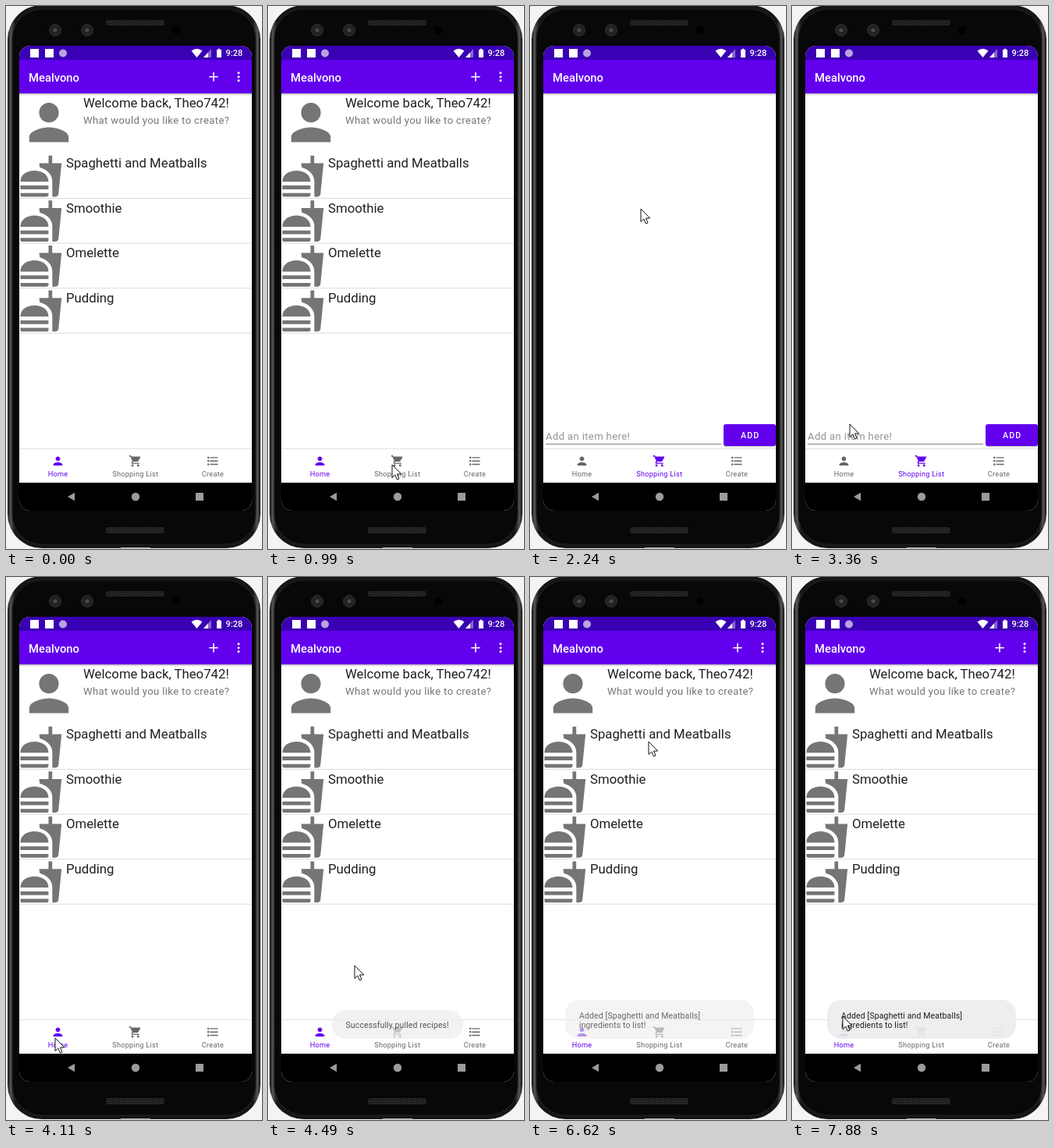
An HTML page that plays this animation: 328 px wide and 696 px high, repeating every 7990 ms.

```html
<!DOCTYPE html>
<html lang="en">
<head>
<meta charset="utf-8">
<title>Recipe app demo</title>
<style>
  html, body { margin: 0; width: 100%; height: 100%; overflow: hidden; background: #f4f4f4; }
  svg { display: block; width: 328px; height: 696px; font-family: Roboto, sans-serif; }
  .row { font-size: 16.75px; fill: #202020; }
  .soft { font-size: 13.1px; letter-spacing: .36px; fill: #757575; }
  .tab { fill: #666; stroke: none; font-size: 9.2px; letter-spacing: .25px; text-anchor: middle; }
  .tab.on { fill: #6200ee; }
  .toast text { font-size: 10.5px; letter-spacing: .12px; fill: #1c1c1c; }
  .toast rect { fill: #ededed; fill-opacity: .93; }
</style>
</head>
<body>
<svg viewBox="0 0 328 696">
  <defs>
    <linearGradient id="rim">
      <stop offset="0" stop-color="#111"/><stop offset=".012" stop-color="#555"/>
      <stop offset=".03" stop-color="#161616"/><stop offset=".97" stop-color="#161616"/>
      <stop offset=".988" stop-color="#555"/><stop offset="1" stop-color="#111"/>
    </linearGradient>
    <linearGradient id="shade" x2="0" y2="1">
      <stop stop-color="#000" stop-opacity=".28"/><stop offset="1" stop-color="#000" stop-opacity="0"/>
    </linearGradient>
    <pattern id="mesh" width="3" height="3" patternUnits="userSpaceOnUse">
      <rect width="3" height="3" fill="#101010"/>
      <path d="M0 0L3 3M3 0L0 3" stroke="#3b3b3b" stroke-width=".7"/>
    </pattern>
    <clipPath id="glass"><rect x="17" y="51" width="298" height="596" rx="14"/></clipPath>
    <path id="person" d="M12 12c2.21 0 4-1.79 4-4s-1.79-4-4-4-4 1.79-4 4 1.79 4 4 4zm0 2c-2.67 0-8 1.34-8 4v2h16v-2c0-2.66-5.33-4-8-4z"/>
    <path id="cart" d="M7 18c-1.1 0-2 .9-2 2s.9 2 2 2 2-.9 2-2-.9-2-2-2zM1 2v2h2l3.6 7.59-1.35 2.45C4.5 15.4 5.5 17 7 17h12v-2H7.42c-.2 0-.3-.2-.22-.37l.9-1.63h7.45c.75 0 1.41-.41 1.75-1.03l3.58-6.49C21.2 4.8 20.7 4 20 4H5.21l-.94-2H1zm16 16c-1.1 0-2 .9-2 2s.9 2 2 2 2-.9 2-2-.9-2-2-2z"/>
    <path id="bullets" d="M2.5 4.5h3v3h-3zM2.5 10.5h3v3h-3zM2.5 16.5h3v3h-3zM7 5h14v2H7zM7 11h14v2H7zM7 17h14v2H7z"/>
    <path id="meal" d="M18.06 23h1.66c.84 0 1.53-.64 1.63-1.46L23 5.05h-5V1h-1.97v4.05h-4.97l.3 2.34c1.71.47 3.31 1.32 4.27 2.26 1.44 1.42 2.43 2.89 2.43 5.29zM1 22v-1h15.03v1c0 .55-.45 1-1.01 1H2c-.56 0-1-.45-1-1zm15.03-7c0-8-15.03-8-15.03 0zM1 17h15v2H1z"/>
  </defs>

  <!-- phone -->
  <rect x="2" y="-1" width="324" height="696" rx="44" fill="url(#rim)"/>
  <rect x="8" y="4" width="312" height="686" rx="38" fill="#080808" stroke="#222"/>
  <path d="M147 695h38" stroke="#bbb" stroke-width="2"/>
  <rect x="128" y="18" width="75" height="7" rx="3" fill="url(#mesh)"/>
  <rect x="128" y="668" width="75" height="8" rx="3" fill="url(#mesh)"/>
  <g fill="#222" stroke="#303030">
    <circle cx="63" cy="31" r="7.5"/><circle cx="104" cy="31" r="7.5"/>
  </g>
  <g fill="#4a4a4a"><circle cx="63" cy="31" r="2.5"/><circle cx="104" cy="31" r="2.5"/></g>
  <circle cx="218" cy="31" r="5" fill="#000"/>

  <g clip-path="url(#glass)">
    <path d="M17 51h298v596H17z" fill="#fff"/>

    <g id="home">
      <use href="#person" transform="translate(17.2 111.5) scale(3.15)" fill="#757575"/>
      <text x="99" y="130" class="row">Welcome back, Theo742!</text>
      <text x="99" y="151" class="soft">What would you like to create?</text>
      <g id="recipes"></g>
    </g>

    <g id="list">
      <text x="20" y="556" class="soft" style="fill:#929292">Add an item here!</text>
      <path d="M20 561.5h225" stroke="#808080"/>
      <rect x="248" y="537.5" width="67" height="28" rx="3" fill="#000" opacity=".2"/>
      <rect x="248" y="536" width="67" height="28" rx="3" fill="#6200ee"/>
      <text x="270" y="554" fill="#fff" font-size="10.6" font-weight="500" letter-spacing="1.2">ADD</text>
    </g>

    <!-- status bar and toolbar -->
    <path d="M17 112h298v3H17z" fill="url(#shade)"/>
    <path d="M17 69h298v43H17z" fill="#6200ee"/>
    <path d="M17 51h298v18H17z" fill="#3a00b3"/>
    <g fill="#fff">
      <path d="M31 55h11v11H31zM50 55h11v11H50z"/>
      <circle cx="73" cy="60.5" r="5" fill="#b9a4e3"/>
      <path d="M237.5 57.5q7-5.5 14 0l-7 8.5z"/>
      <path d="M253 66l10-11v11z" opacity=".4"/><path d="M253 66l6-6.6V66z"/>
      <path d="M270 56h1.7v-1.2h2.6V56h1.7v10h-6z"/>
      <text x="281.5" y="64.3" font-size="11" font-weight="500">9:28</text>
      <text x="29" y="97" font-size="14.8" font-weight="500">Mealvono</text>
    </g>
    <g id="actions" fill="#fff">
      <path d="M266 85v11.4M260.3 90.7h11.4" stroke="#fff" stroke-width="1.6"/>
      <circle cx="298" cy="85.8" r="1.5"/><circle cx="298" cy="90.7" r="1.5"/><circle cx="298" cy="95.6" r="1.5"/>
    </g>

    <!-- navigation -->
    <path d="M17 567h298v1H17z" fill="#e2e2e2"/>
    <path d="M17 568h298v43H17z" fill="#fff"/>
    <g id="tabs"></g>
    <path d="M17 611h298v36H17z" fill="#000"/>
    <g fill="#9b9b9b">
      <path d="M79 629l9-5.2v10.4zM243 624h10v10h-10z"/><circle cx="166" cy="629" r="5.2"/>
    </g>

    <g id="pulled" class="toast">
      <rect x="82" y="555" width="168" height="37" rx="18"/>
      <text x="99.5" y="578">Successfully pulled recipes!</text>
    </g>
    <g id="added" class="toast">
      <rect x="45" y="542" width="242" height="50" rx="18"/>
      <text x="63" y="565.5">Added [Spaghetti and Meatballs]</text>
      <text x="63" y="578">ingredients to list!</text>
    </g>
  </g>

  <path id="cursor" d="M0 0V16.5L3.8 13 6.4 19 9 17.9 6.5 12H11.8Z" fill="#fff" stroke="#111" stroke-width="1" stroke-linejoin="round"/>
</svg>

<script>
  const $ = id => document.getElementById(id);
  const LOOP = 7990, STEP = 125;

  $('recipes').innerHTML = ['Spaghetti and Meatballs', 'Smoothie', 'Omelette', 'Pudding'].map((name, i) =>
    `<g transform="translate(0 ${i * 57.6})">
      <use href="#meal" transform="translate(16 189.3) scale(2.4)" fill="#757575"/>
      <text x="77" y="207.3" class="row">${name}</text>
      <path d="M17 246.5h298" stroke="#dcdcdc"/></g>`).join('');

  $('tabs').innerHTML = [['person', 'Home', 66.5], ['cart', 'Shopping List', 165.7], ['bullets', 'Create', 265]].map(([icon, label, x]) =>
    `<g class="tab"><use href="#${icon}" transform="translate(${x - 8.7} 574.5) scale(.725)"/>
      <text x="${x}" y="603">${label}</text></g>`).join('');
  const tabs = $('tabs').children;

  // Pointer path: step, x, y
  const path = [
    [2, 308, 446], [4, 232, 508], [8, 159, 588], [13, 159, 588], [15, 150, 490],
    [17, 136, 300], [18, 142, 260], [20, 258, 208], [21, 264, 190], [22, 244, 169],
    [25, 122, 400], [27, 74, 536], [30, 63, 591], [33, 63, 591], [36, 111, 498],
    [38, 243, 443], [40, 276, 330], [42, 225, 205], [45, 152, 211], [55, 152, 211],
    [57, 89, 527], [58, 196, 499], [60, 160, 617], [61, 96, 580], [62, 111, 535], [63, 65, 563]
  ];

  function pointerAt(step) {
    const i = path.findIndex(p => p[0] >= step);
    if (i < 1) return path[0].slice(1);
    const [a, ax, ay] = path[i - 1], [b, bx, by] = path[i];
    const u = (step - a) / (b - a);
    return [ax + (bx - ax) * u, ay + (by - ay) * u];
  }

  const ramp = (v, from, to) => Math.min(1, Math.max(0, (v - from) / (to - from)));

  function draw(now) {
    const step = Math.min(63, Math.floor((now % LOOP + 20) / STEP));
    const shopping = step >= 12 && step < 32;
    $('home').style.display = $('actions').style.display = shopping ? 'none' : '';
    $('list').style.display = shopping ? '' : 'none';
    tabs[0].classList.toggle('on', !shopping);
    tabs[1].classList.toggle('on', shopping);

    $('pulled').style.opacity = ramp(step, 33, 37) * (1 - ramp(step, 48, 51));
    $('added').style.opacity = ramp(step, 51, 54);

    const [x, y] = pointerAt(step);
    $('cursor').style.display = step < 2 ? 'none' : '';
    $('cursor').setAttribute('transform', `translate(${x} ${y})`);
  }

  const start = performance.now();
  function tick() {
    draw(performance.now() - start);
    requestAnimationFrame(tick);
  }
  tick();
</script>
</body>
</html>
```
